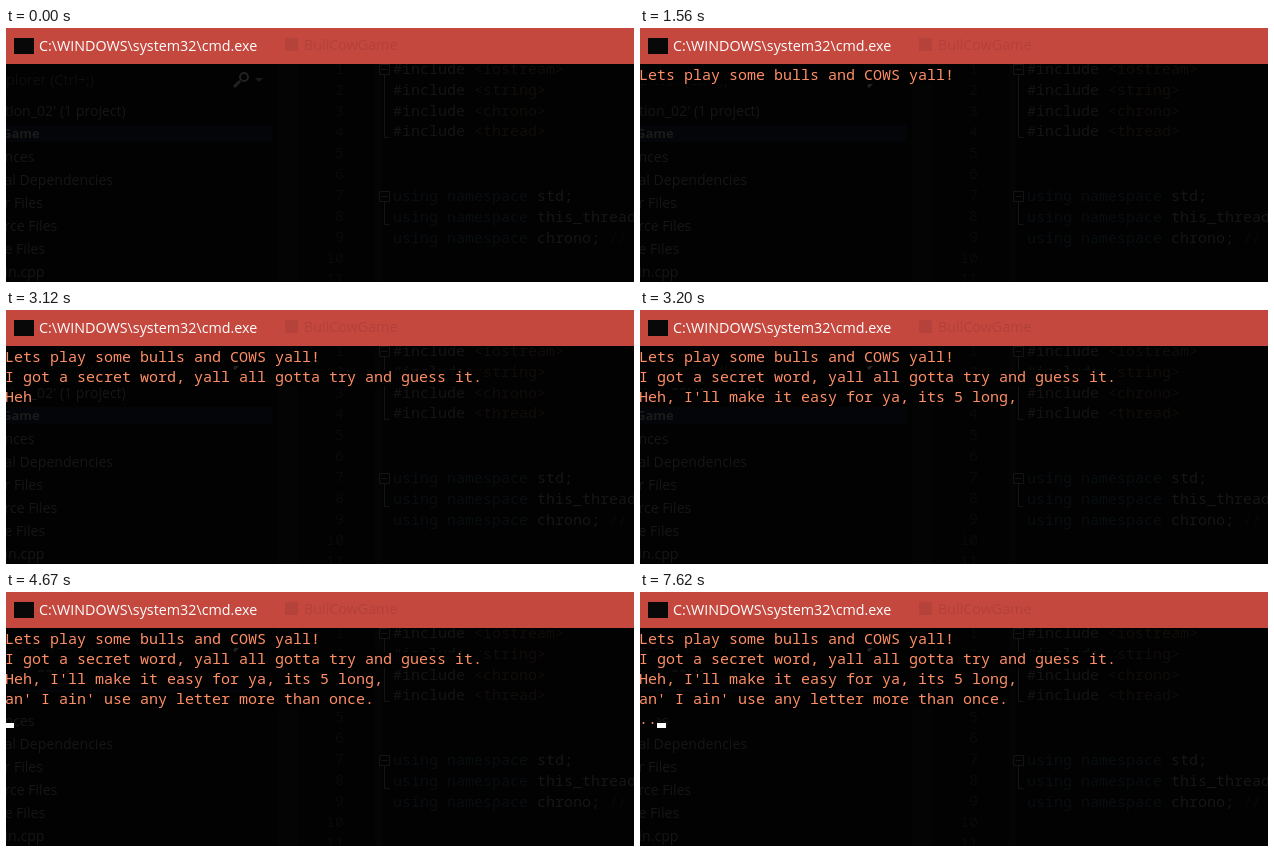
An HTML page for the animation above (8000 ms loop, 628x254 px).

```html
<!DOCTYPE html>
<html lang="en">
<head>
<meta charset="utf-8">
<title>Console word game</title>
<style>
html, body { margin: 0; width: 100%; height: 100%; overflow: hidden; background: #020202; }
svg { display: block; }
text { white-space: pre; }
.ui { font: 14.3px "Open Sans", "Noto Sans", sans-serif; }
.side { font: 14.1px "Open Sans", "Noto Sans", sans-serif; }
.bold { font: bold 13px "Open Sans", "Noto Sans", sans-serif; }
.mono { font: 15px "Noto Sans Mono", "DejaVu Sans Mono", monospace; }
</style>
</head>
<body>
<svg id="stage" width="628" height="254" viewBox="0 0 628 254"></svg>
<script>
const LOOP = 8000, CELL = 9, LEFT = -1, FOREVER = Infinity;
const BLACK = "#020202";
const stage = document.getElementById("stage");

function add(tag, attrs, content = "") {
  const el = document.createElementNS("http://www.w3.org/2000/svg", tag);
  for (const key in attrs) el.setAttribute(key, attrs[key]);
  el.textContent = content;
  stage.append(el);
  return el;
}
const rect = (x, y, width, height, fill) => add("rect", { x, y, width, height, fill });
const label = (x, y, text, fill, cls, anchor = "start") =>
  add("text", { x, y, fill, class: cls, "text-anchor": anchor }, text);
const stroke = (d, color, width = 1) =>
  add("path", { d, fill: "none", stroke: color, "stroke-width": width });

// Dim editor behind the console
rect(0, 36, 628, 218, BLACK);
rect(272, 36, 20, 218, "#040404");
rect(369, 36, 7, 218, "#040404");
rect(0, 97, 266, 17, "#030508");

label(0, 57, "plorer (Ctrl+;)", "#0e0e0e", "ui");
stroke("M228 59L234 53", "#222", 3);
add("circle", { cx: 238, cy: 49, r: 4, fill: "none", stroke: "#222", "stroke-width": 2 });
add("path", { d: "M249 50h8l-4 4z", fill: "#1a1a1a" });

label(-1, 88, "tion_02' (1 project)", "#161616", "side");
label(-4, 110, "Game", "#1b1b1b", "bold");
["nces", "al Dependencies", "r Files", "rce Files", "e Files", "in.cpp"]
  .forEach((name, i) => label(-1.5, 134 + 23 * i, name, "#161616", "side"));

for (let n = 1; n <= 11; n++)
  label(338, 25 + 21 * n, n, "#090b0b", "mono", "end");

["iostream", "string", "chrono", "thread"].forEach((lib, i) => {
  const y = 46 + 20.8 * i;
  label(387, y, "#include", "#141414", "mono");
  label(387 + 9 * CELL, y, `<${lib}>`, "#110d0b", "mono");
});
["std;", "this_thread;", "chrono;"].forEach((space, i) => {
  const y = 173 + 21 * i;
  label(387, y, "using namespace", "#090e11", "mono");
  label(387 + 16 * CELL, y, space, "#161616", "mono");
});
label(387 + 24 * CELL, 215, "//", "#070a07", "mono");
for (const [y, end] of [[35, 110], [162, 197]])
  stroke(`M373.5 ${y + 1.5}h10v10h-10zM375.5 ${y + 6.5}h6M378.5 ${y + 12}V${end - 0.5}h5`, "#141414");

// Title bar
rect(0, 0, 628, 36, "#c5483f");
rect(8, 10, 20, 16, "#080808");
label(33, 22.5, "C:\\WINDOWS\\system32\\cmd.exe", "#fff", "ui");
rect(279, 10, 13, 13, "#b5433b");
label(298, 22, "BullCowGame", "#b2413a", "ui");

// Console output: start, end, row, text
const output = [
  [170, FOREVER, 0, "Lets play some bulls and COWS yall!"],
  [1640, FOREVER, 1, "I got a secret word, yall all gotta try and guess it."],
  [3120, 3200, 2, "Heh"],
  [3200, FOREVER, 2, "Heh, I'll make it easy for ya, its 5 long,"],
  [4670, FOREVER, 3, "an' I ain' use any letter more than once."],
  [6150, 7620, 4, "."],
  [7620, FOREVER, 4, ".."]
].map(([start, end, row, text]) => ({
  start, end,
  parts: [
    rect(LEFT, 40 + 20 * row, text.length * CELL, 16, BLACK),
    label(LEFT, 52 + 20 * row, text, "#ff8f67", "mono")
  ]
}));

// Cursor: start, end, row, column
const blinks = [
  [1010, 1560, 1, 0], [2570, 3120, 2, 0], [4210, 4670, 3, 0],
  [4670, 5220, 4, 0], [5750, 6150, 4, 0], [6150, 6850, 4, 1],
  [7310, 7620, 4, 1], [7620, LOOP, 4, 2]
].map(([start, end, row, col]) => ({
  start, end,
  parts: [rect(LEFT + CELL * col, 51 + 20 * row, CELL, 5, "#fff")]
}));

const timed = [...output, ...blinks];
function draw(now) {
  const t = now % LOOP;
  for (const { start, end, parts } of timed)
    for (const part of parts)
      part.setAttribute("visibility", t >= start && t < end ? "visible" : "hidden");
  requestAnimationFrame(draw);
}
draw(performance.now());
</script>
</body>
</html>
```
